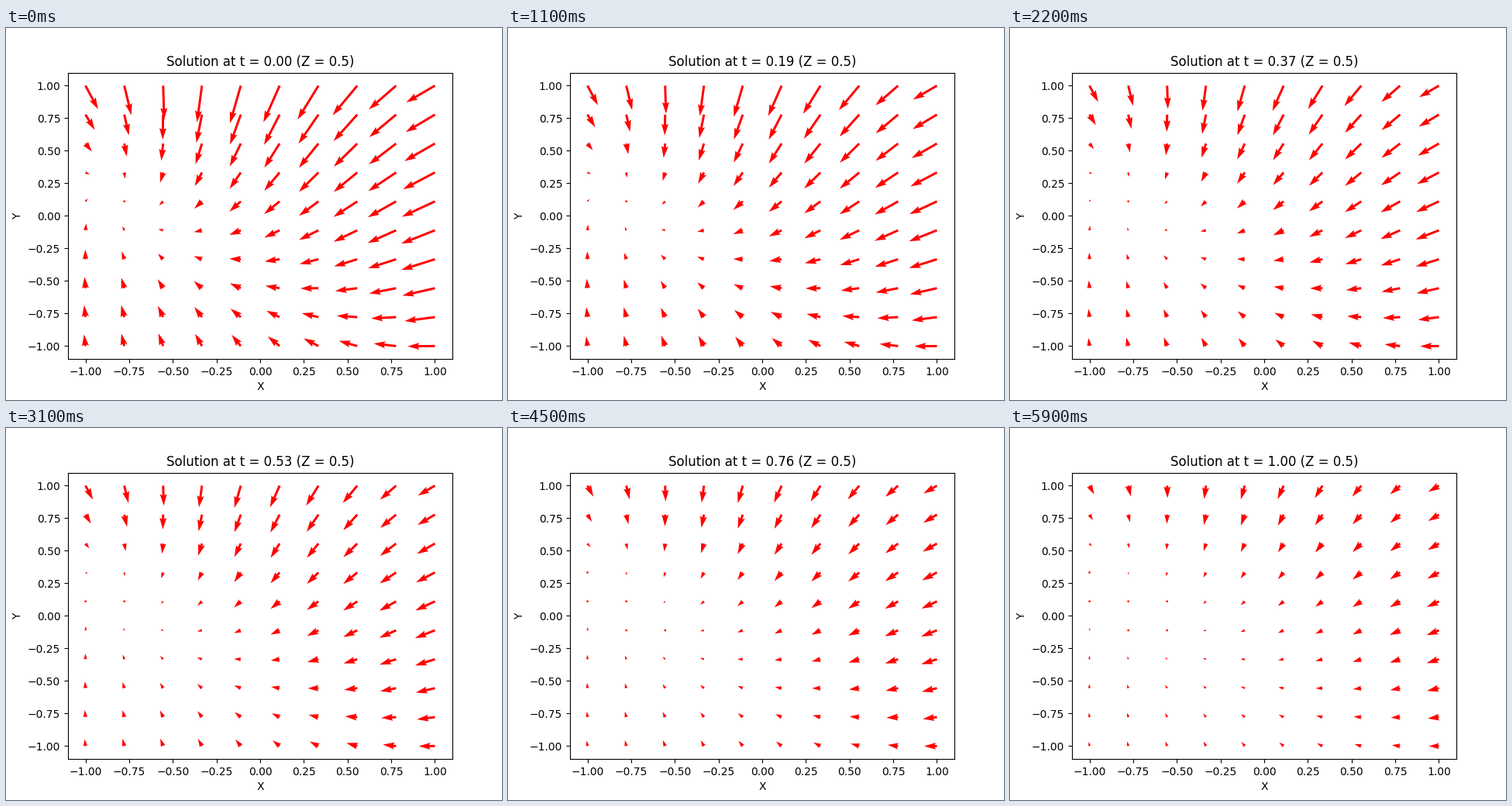
These frames come from a looping animation (640x480 px, 6000 ms). A matplotlib script:

```python
import numpy as np
import matplotlib.pyplot as plt
from matplotlib.animation import FuncAnimation

FRAMES = 60
INTERVAL = 100
N = 10
Z = 0.5


def flow(x, y, z, t):
    """Two components of a decaying Beltrami flow."""
    decay = np.exp(-t)
    v = -(np.exp(y) * np.sin(z + x) + np.exp(x) * np.cos(y + z)) * decay
    w = -(np.exp(z) * np.sin(x + y) + np.exp(y) * np.cos(z + x)) * decay
    return v, w


axis = np.linspace(-1, 1, N)
X, Y = np.meshgrid(axis, axis)
times = np.linspace(0, 1, FRAMES)

fig, ax = plt.subplots(figsize=(6.4, 4.8), dpi=100)
U, V = flow(X, Y, Z, 0)
# Arrow scale stays fixed at the value that suits the initial field.
scale = 1.8 * N * np.hypot(U, V).mean()
arrows = ax.quiver(X, Y, U, V, color="red", scale=scale)
ax.set(xlim=(-1.1, 1.1), ylim=(-1.1, 1.1), xlabel="X", ylabel="Y")
title = ax.set_title("")


def update(i):
    t = times[i]
    arrows.set_UVC(*flow(X, Y, Z, t))
    title.set_text(f"Solution at t = {t:.2f} (Z = {Z})")
    return arrows, title


anim = FuncAnimation(fig, update, frames=FRAMES, interval=INTERVAL,
                     repeat=True, repeat_delay=0, blit=False)
plt.show()
```
